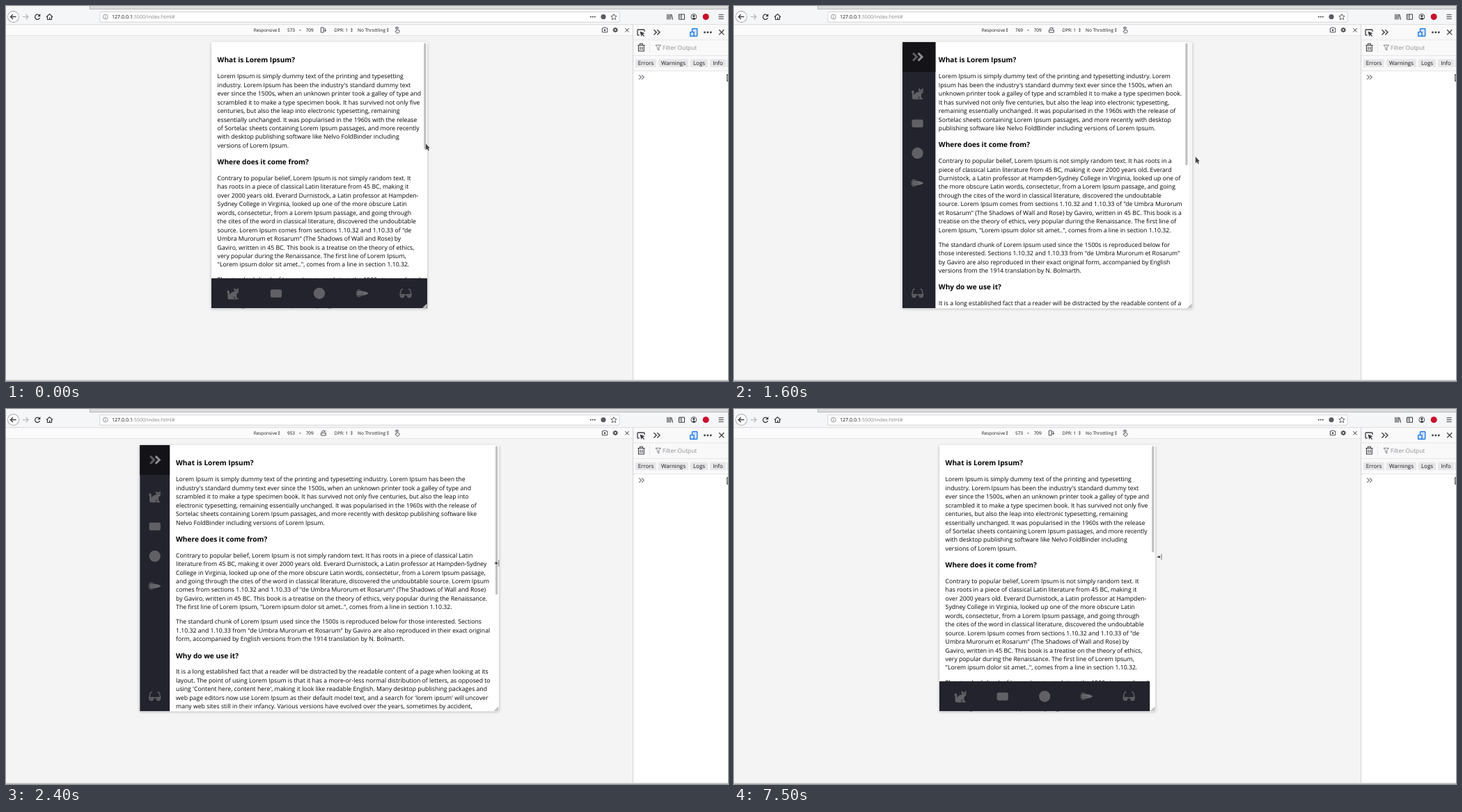
These frames come from a looping animation (1037x540 px, 8 s). An HTML page with a canvas:

```html
<!DOCTYPE html>
<html lang="en">
<head>
<meta charset="utf-8">
<title>Responsive sidebar</title>
<style>
html, body { margin: 0; width: 100%; height: 100%; overflow: hidden; background: #f4f4f4; }
canvas { display: block; }
</style>
</head>
<body>
<canvas id="stage" width="1037" height="540"></canvas>
<script>
const ctx = document.getElementById('stage').getContext('2d');
const LOOP = 8000, STEP = 100;
const SCALE = 0.5412, TOP = 51.7, CENTER = 450, PAGE_H = 709, BAR = 80;
const FONT = '"Open Sans", "Noto Sans", sans-serif';
const INK = '#3c3c40', NAV = '#23232e', ICON = '#606065', ICON_DIM = '#4b4b52';

const article = [
  ['h', 'What is Lorem Ipsum?'],
  ['p', "Lorem Ipsum is simply dummy text of the printing and typesetting industry. Lorem Ipsum has been the industry's standard dummy text ever since the 1500s, when an unknown printer took a galley of type and scrambled it to make a type specimen book. It has survived not only five centuries, but also the leap into electronic typesetting, remaining essentially unchanged. It was popularised in the 1960s with the release of Sortelac sheets containing Lorem Ipsum passages, and more recently with desktop publishing software like Nelvo FoldBinder including versions of Lorem Ipsum."],
  ['h', 'Where does it come from?'],
  ['p', 'Contrary to popular belief, Lorem Ipsum is not simply random text. It has roots in a piece of classical Latin literature from 45 BC, making it over 2000 years old. Everard Durnistock, a Latin professor at Hampden-Sydney College in Virginia, looked up one of the more obscure Latin words, consectetur, from a Lorem Ipsum passage, and going through the cites of the word in classical literature, discovered the undoubtable source. Lorem Ipsum comes from sections 1.10.32 and 1.10.33 of "de Umbra Murorum et Rosarum" (The Shadows of Wall and Rose) by Gaviro, written in 45 BC. This book is a treatise on the theory of ethics, very popular during the Renaissance. The first line of Lorem Ipsum, "Lorem ipsum dolor sit amet..", comes from a line in section 1.10.32.'],
  ['p', 'The standard chunk of Lorem Ipsum used since the 1500s is reproduced below for those interested. Sections 1.10.32 and 1.10.33 from "de Umbra Murorum et Rosarum" by Gaviro are also reproduced in their exact original form, accompanied by English versions from the 1914 translation by N. Bolmarth.'],
  ['h', 'Why do we use it?'],
  ['p', "It is a long established fact that a reader will be distracted by the readable content of a page when looking at its layout. The point of using Lorem Ipsum is that it has a more-or-less normal distribution of letters, as opposed to using 'Content here, content here', making it look like readable English. Many desktop publishing packages and web page editors now use Lorem Ipsum as their default model text, and a search for 'lorem ipsum' will uncover many web sites still in their infancy. Various versions have evolved over the years, sometimes by accident, sometimes on purpose."]
];
const styles = {
  h: { font: `bold 18.72px ${FONT}`, line: 26.6, ascent: 20.1, margin: 18.72 },
  p: { font: `16.07px ${FONT}`, line: 23, ascent: 17.2, margin: 16 }
};

// Drawing helpers
function rect(x, y, w, h, color) {
  ctx.fillStyle = color;
  ctx.fillRect(x, y, w, h);
}
function round(x, y, w, h, r, color) {
  ctx.fillStyle = color;
  ctx.beginPath();
  ctx.roundRect(x, y, w, h, r);
  ctx.fill();
}
function disc(x, y, r, color) {
  ctx.fillStyle = color;
  ctx.beginPath();
  ctx.arc(x, y, r, 0, 2 * Math.PI);
  ctx.fill();
}
function line(path, color = INK, width = 1.1) {
  ctx.strokeStyle = color;
  ctx.lineWidth = width;
  ctx.stroke(new Path2D(path));
}
function shape(path, color = INK) {
  ctx.fillStyle = color;
  ctx.fill(new Path2D(path));
}
function label(text, x, centerY, size, color = '#18181a', align = 'left') {
  ctx.font = `${size}px ${FONT}`;
  ctx.fillStyle = color;
  ctx.textAlign = align;
  ctx.fillText(text, x, centerY + size * 0.36);
  ctx.textAlign = 'left';
}
function at(x, y, draw) {
  ctx.save();
  ctx.translate(x, y);
  draw();
  ctx.restore();
}

// Timing helpers
function track(points, x) {
  if (x <= points[0][0]) return points[0][1];
  for (let i = 1; i < points.length; i++) {
    const [x0, y0] = points[i - 1], [x1, y1] = points[i];
    if (x <= x1) return y0 + (y1 - y0) * (x - x0) / (x1 - x0);
  }
  return points[points.length - 1][1];
}
function ease(p) {
  if (p <= 0) return 0;
  if (p >= 1) return 1;
  const bezier = (a, b, u) => 3 * a * u * (1 - u) ** 2 + 3 * b * u * u * (1 - u) + u ** 3;
  let lo = 0, hi = 1;
  for (let i = 0; i < 24; i++) {
    const mid = (lo + hi) / 2;
    if (bezier(0.25, 0.25, mid) < p) lo = mid; else hi = mid;
  }
  return bezier(0.1, 1, lo);
}

function viewWidth(t) {
  if (t >= 7500) return 573;
  if (t >= 5100) return 559;
  if (t < 1000) return 573;
  return Math.round(track([[1000, 605], [1100, 623], [1600, 769], [1800, 874], [2000, 929], [2400, 953]], t));
}
// The page reflows slightly after the frame grows.
function layoutLag(t) {
  if (t < 1000) return 0;
  return track([[1000, 32], [1100, 18], [1200, 9], [2300, 9], [2400, 0]], t);
}
function navWidth(t) {
  if (t < 1100) return 573;
  if (t < 5100) return 573 + (BAR - 573) * ease((t - 1100) / 600);
  if (t < 5400) return 251;
  return t < 5700 ? 507 : 559;
}

// Article
const layouts = new Map();
function layoutArticle(width) {
  if (layouts.has(width)) return layouts.get(width);
  const lines = [];
  let y = 16, gap = 0;
  for (const [kind, text] of article) {
    const style = styles[kind];
    ctx.font = style.font;
    y += Math.max(gap, style.margin);
    let current = '';
    const flush = () => {
      lines.push({ text: current.trimEnd(), y: y + style.ascent, font: style.font });
      y += style.line;
      current = '';
    };
    for (const piece of text.match(/[^\s-]+(?:-|\s*)/g)) {
      if (current && ctx.measureText((current + piece).trimEnd()).width > width) flush();
      current += piece;
    }
    flush();
    gap = style.margin;
  }
  layouts.set(width, lines);
  return lines;
}

// Navigation icons, centred on 0,0
const icons = [
  function cat() {
    shape('M3-15L7-11H11L15-15V-5Q15 0 10 1L10 12L14 13V16H5L5 8L0 12H4V16H-10Q-14 16-14 11V-1Q-16-2-16-5T-12-8Q-9-7-9-3V5Q-6-4 4-4Q3-6 3-9Z', ICON);
    disc(7, -7, 1.2, NAV);
    disc(11, -7, 1.2, NAV);
  },
  function block() { round(-15, -10, 30, 21, 4, ICON); },
  function ball() { disc(0, 0, 15, ICON); },
  function shuttle() {
    shape('M-14-10H-8L2-5H-14ZM-14 10H-8L2 5H-14Z', ICON_DIM);
    rect(-17, -6, 4, 12, ICON_DIM);
    shape('M-13-5H4Q12-4 16 0Q12 4 4 5H-13Z', '#6c6c70');
    rect(-10, -1, 13, 2, ICON_DIM);
  },
  function glasses() {
    line('M-15 4L-12-9Q-11-12-7-11M15 4L12-9Q11-12 7-11M-4 4H4', ICON, 2.6);
    shape('M-16 2H-3L-4 9Q-5 12-9 12T-15 9ZM16 2H3L4 9Q5 12 9 12T15 9Z', ICON);
    shape('M-13 5H-6L-11 9ZM13 5H6L6 9Z', ICON_DIM);
  }
];

function drawNav(t) {
  const width = navWidth(t), side = t >= 1100 && t < 5100;
  const top = side ? 0 : PAGE_H - BAR;
  ctx.save();
  ctx.beginPath();
  ctx.rect(0, top, width, PAGE_H - top);
  ctx.clip();
  rect(0, top, width, PAGE_H - top, NAV);
  if (side) {
    rect(0, 0, width, BAR, '#141418');
    at(40, 40, () => {
      shape('M-14-8L-10-12L2 0L-10 12L-14 8L-6 0Z', '#5d5d60');
      shape('M0-8L4-12L16 0L4 12L0 8L8 0Z', '#8d8d90');
    });
    icons.forEach((icon, i) => at(40, i < 4 ? 137 + i * 79.5 : 669, icon));
  } else {
    const slot = Math.max(BAR, width / 5);
    icons.forEach((icon, i) => at(slot * (i + 0.5), 669, icon));
    if (slot * 5 > width) round(6, 702, 130, 6, 3, '#17171d');
  }
  ctx.restore();
}

function drawPage(t) {
  const view = viewWidth(t), layout = Math.round(view - layoutLag(t));
  const inset = t >= 1100 && t < 5100 ? BAR : 0;
  const textWidth = layout - inset - 32;
  ctx.save();
  ctx.translate(CENTER - view * SCALE / 2, TOP);
  ctx.scale(SCALE, SCALE);

  ctx.shadowColor = 'rgba(0,0,0,.28)';
  ctx.shadowBlur = 4;
  ctx.shadowOffsetY = 1;
  rect(0, 0, view, PAGE_H, '#f6f6f7');
  ctx.shadowColor = 'transparent';

  ctx.beginPath();
  ctx.rect(0, 0, view, PAGE_H);
  ctx.clip();
  rect(0, 0, layout, PAGE_H, '#fff');
  for (const row of layoutArticle(textWidth)) {
    if (row.y > PAGE_H + 20) break;
    ctx.font = row.font;
    ctx.fillStyle = '#000';
    ctx.fillText(row.text, inset + 16, row.y);
  }
  drawNav(t);
  const thumb = track([[493, 139], [527, 145], [541, 153], [648, 176], [808, 205], [841, 214]], textWidth);
  round(layout - 9, 3, 6, thumb / SCALE, 3, '#c1c1c2');
  shape(`M${view - 13} 708L${view - 1} 696V708Z`, '#b5b5b8');
  line(`M${view - 8} 708L${view - 1} 701`, '#e3e3e5', 1.5);
  ctx.restore();
}

// Browser window
function drawBrowserBar() {
  rect(0, 0, 1037, 27, '#f5f6f7');
  rect(121, 0, 916, 4, '#dcdcde');
  rect(121, 4, 916, 1, '#b9b9bc');
  rect(120, 0, 1, 5, '#b0b0b3');
  disc(10.5, 15.5, 8.4, '#a5a5a8');
  disc(10.5, 15.5, 7.6, '#fff');
  line('M14.5 15.5H7M10 12L6.5 15.5L10 19', INK, 1.3);
  line('M24 15.5H32M28.5 12L32 15.5L28.5 19', '#b3b3b6', 1.2);
  line('M48 13.5A3.6 3.6 0 1 0 48.6 17', INK, 1.3);
  shape('M49.3 11V15.2H45.2Z');
  line('M58 15.8L62.5 11.5L67 15.8M59.5 15V19.5H65.5V15', INK, 1.2);
  rect(62, 16.5, 1.4, 3, INK);

  round(134.5, 8, 747, 15.5, 1.5, '#c6c6c9');
  round(135.2, 8.7, 745.6, 14.1, 1, '#fff');
  line('M146.2 15.5A3.4 3.4 0 1 1 139.4 15.5A3.4 3.4 0 1 1 146.2 15.5M142.8 15V17.5M142.8 13.3V14.1', '#77777a', 0.8);
  label('127.0.0.1', 152, 15.8, 7.1, '#0c0c0d');
  const hostWidth = ctx.measureText('127.0.0.1').width;
  label(':5500/index.html#', 152 + hostWidth, 15.8, 7.1, '#85858a');
  for (const x of [839.8, 842.8, 845.8]) disc(x, 15.5, 1, INK);
  disc(858, 15.5, 3.6, '#5a5a5f');
  line('M873 11.5L874.3 14.2L877.2 14.5L875 16.5L875.7 19.5L873 18L870.3 19.5L871 16.5L868.8 14.5L871.7 14.2Z', INK, 0.8);

  line('M949.8 11.8V19.5M952 11.8V19.5M954.2 11.8V19.5M955.6 12L957.5 19.5', INK, 1.1);
  line('M966.5 12H974.5V19.2H966.5ZM970 12V19', INK, 1);
  line('M967.5 14H969.3M967.5 16H969.3', INK, 0.7);
  line('M991.9 15.5A4 4 0 1 1 983.9 15.5A4 4 0 1 1 991.9 15.5', INK, 0.9);
  disc(987.9, 14.4, 1.6, INK);
  shape('M985 18.2Q988 15.2 991 18.2L988 19.4Z');
  disc(1005.2, 15.5, 4.5, '#c8102e');
  line('M1023.5 12.7H1030.7M1023.5 15.5H1030.7M1023.5 18.3H1030.7', INK, 1);
  rect(0, 26.5, 1037, 0.8, '#cacacc');
}

function arrowsUpDown(x) {
  shape(`M${x} 34L${x + 1.5} 31.8L${x + 3} 34ZM${x} 35.2H${x + 3}L${x + 1.5} 37.4Z`, '#4c4c50');
}

function drawDeviceBar(view) {
  rect(0, 27.3, 900, 15, '#fbfbfc');
  rect(0, 42, 900, 0.8, '#e2e2e4');
  label('Responsive', 355.7, 34.6, 6.4);
  arrowsUpDown(390.5);
  label(String(view), 409.5, 34.8, 6.5, '#0c0c0d', 'center');
  label('×', 422.5, 34.8, 6, '#55555a', 'center');
  label('709', 436.2, 34.8, 6.5, '#0c0c0d', 'center');
  if (view > 709) line('M452.5 34.5H459.3V38H452.5ZM453.8 33.5V32Q455.5 30 457.6 32.3M456.5 32.5H458.2V30.8', INK, 0.9);
  else line('M452.3 31H456.2V38H452.3ZM457.5 32.5H458.6V36M457.2 35L458.6 36.6L460 35', INK, 0.9);
  label('DPR: 1', 471.5, 34.6, 6.4);
  arrowsUpDown(495);
  label('No Throttling', 505, 34.6, 6.5);
  arrowsUpDown(546.8);
  line('M560.7 36V31.7Q561.5 30.8 562.3 31.7V34.5L565 35.2V37Q564.5 39 562.8 39H561L559 36.3ZM559.3 32.5Q559.5 30 561.5 30T563.8 32.5', INK, 0.8);
  line('M856.3 32H858L858.5 31H861.5L862 32H863.8V37.7H856.3Z', INK, 0.9);
  disc(860, 34.8, 1.3, INK);
  line('M875.2 30.7V38.3M871.4 34.5H879M872.5 31.8L877.9 37.2M877.9 31.8L872.5 37.2', INK, 1.2);
  disc(875.2, 34.5, 2.7, INK);
  disc(875.2, 34.5, 1.3, '#fbfbfc');
  line('M889.3 32L894.8 37.5M894.8 32L889.3 37.5', INK, 1);
}

function drawConsole() {
  rect(900, 27.3, 137, 512.7, '#fff');
  rect(900, 27.3, 137, 65.5, '#f9f9fa');
  rect(900, 27, 1, 513, '#d3d3d6');
  for (const y of [48.5, 71, 93]) rect(901, y, 136, 0.8, '#e0e0e3');

  line('M909.5 42H908Q907 42 907 41V35Q907 34 908 34H916Q917 34 917 35V37', INK, 1.3);
  shape('M910.5 36.5L917.5 39.3L914.6 40.4L917 43L916 44L913.6 41.4L912.4 44Z');
  line('M930.5 34.2L934.2 37.8L930.5 41.4M935.3 34.2L939 37.8L935.3 41.4', INK, 1.4);
  const devices = 'M985.5 37.5V33.5Q985.5 32.7 986.3 32.7H992Q992.8 32.7 992.8 33.5V42.5Q992.8 43.3 992 43.3H988V37.5ZM982.8 37.5H988V43.3H982.8Z';
  shape(devices, '#cfe2fa');
  line(devices, '#0a6be0', 1.2);
  for (const x of [1003.5, 1007.9, 1012.3]) disc(x, 37.9, 1.4, INK);
  line('M1024.2 34.3L1031.3 41.4M1031.3 34.3L1024.2 41.4', INK, 1.3);

  line('M907.3 56.5H917.5M910.5 56V54.3H914.3V56M908.5 57V65H916.3V57M911 58.5V63.3M913.8 58.5V63.3', INK, 1.1);
  rect(924, 52, 0.8, 15, '#e0e0e3');
  line('M933 56.3H940.5L937.8 59.5V64L935.8 62.5V59.5Z', '#77777c', 0.9);
  label('Filter Output', 943, 60, 8.3, '#8d8d92');
  const filters = [['Errors', 904, 30], ['Warnings', 937, 43], ['Logs', 983, 25], ['Info', 1011, 23]];
  for (const [name, x, w] of filters) {
    round(x, 76.5, w, 11.5, 1.3, '#e7e7e9');
    label(name, x + w / 2, 82.3, 8, '#18181a', 'center');
  }
  rect(1035.5, 76.5, 1.5, 11.5, '#e7e7e9');
  line('M909.2 99.3L912.4 102.6L909.2 105.9M913 99.3L916.2 102.6L913 105.9', '#74747e', 1.2);
  line('M1037 98.8H1035.8V107.8H1037', INK, 1.2);
}

function drawCursor(t) {
  const dragging = t >= 1000 && t < 1900;
  if (t < 600 || dragging) {
    const x = dragging ? track([[1000, 616], [1100, 633], [1600, 662.8], [1800, 688.5]], t) : 602.7;
    const y = dragging ? track([[1100, 213], [1600, 217], [1800, 220]], t) : track([[200, 198], [500, 204]], t);
    at(x, y, () => {
      const arrow = 'M0 0V9.2L2.1 7.5L3.6 10.6L5.2 9.8L3.7 6.8L6 6.5Z';
      line(arrow, '#fff', 0.9);
      shape(arrow, '#414144');
    });
    return;
  }
  let x = 608, y = 212;
  if (t >= 7500) [x, y] = [614, 213];
  else if (t >= 5100) [x, y] = [601, 214.5];
  else if (t >= 1900) [x, y] = [track([[1900, 694], [2000, 702.7], [2400, 707.7]], t), 222];
  at(x, y, () => {
    line('M0-4.5V4.5', '#77777a', 1);
    line('M-6 0H-2', '#333336', 1.2);
    shape('M-4.2-2L-1.2 0L-4.2 2Z', '#333336');
  });
}

function render(t) {
  rect(0, 0, 1037, 540, '#f4f4f4');
  drawBrowserBar();
  drawDeviceBar(viewWidth(t));
  drawPage(t);
  drawConsole();
  drawCursor(t);
  rect(0, 538, 1037, 1, '#dededf');
  rect(0, 539, 1037, 1, '#bcbcbe');
}

ctx.textRendering = 'geometricPrecision';
const start = performance.now();
function tick() {
  const elapsed = Math.max(0, performance.now() - start) % LOOP;
  render(Math.floor(elapsed / STEP) * STEP);
  requestAnimationFrame(tick);
}
tick();
</script>
</body>
</html>
```
